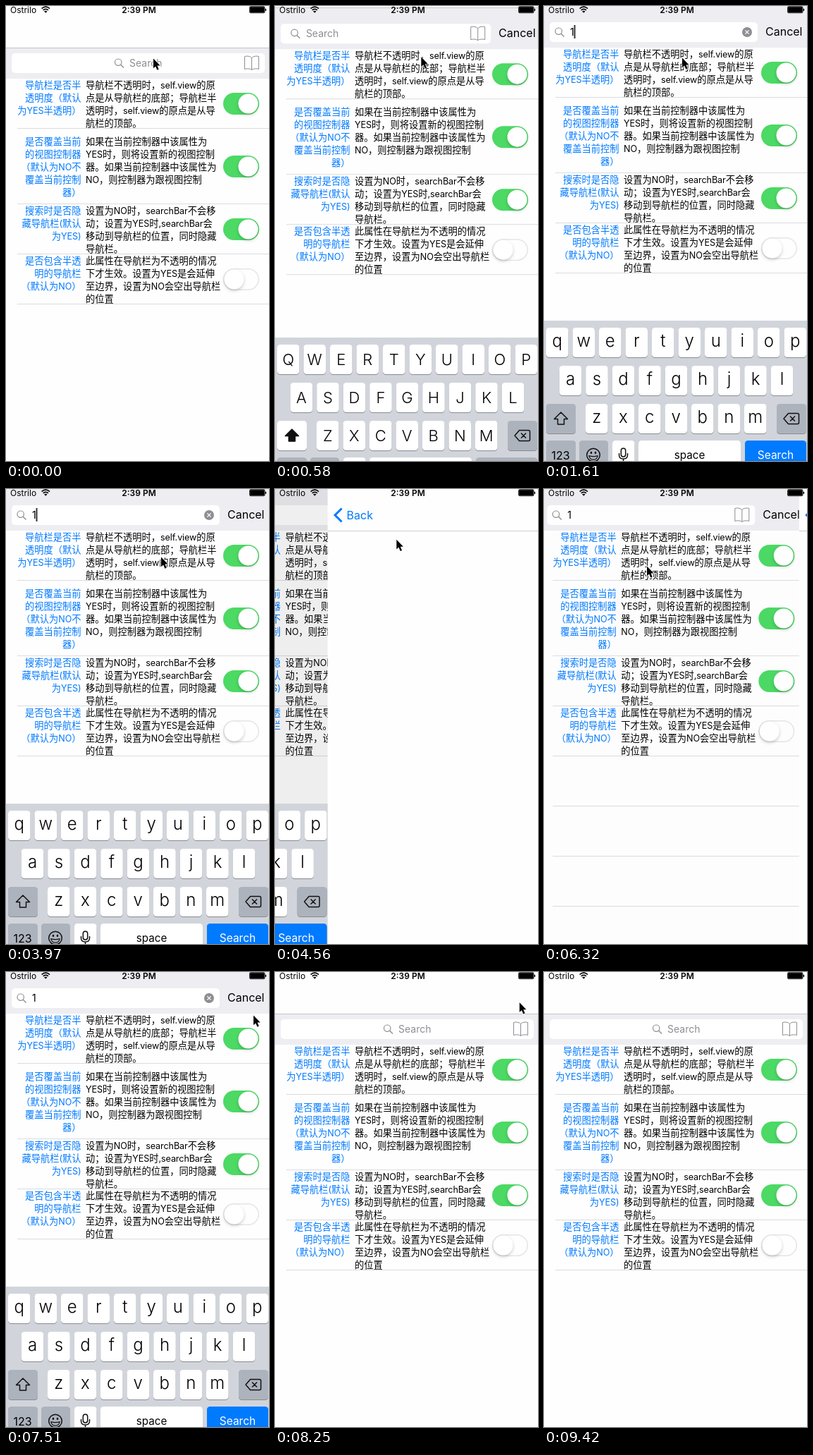
An HTML page that plays this animation: 373x645 px, repeating every 9760 ms.

```html
<!DOCTYPE html>
<html lang="zh-CN">
<head>
<meta charset="utf-8">
<style>
html, body { margin: 0; width: 373px; height: 645px; overflow: hidden; background: #fefefe; }
svg { display: block; }
text { font-family: Inter, Roboto, sans-serif; }
.cjk { font: 13.25px "Noto Sans CJK SC", "Noto Sans CJK", sans-serif; }
.cjk tspan { font: 12.6px Inter, Roboto, sans-serif; letter-spacing: -.1px; }
.end { text-anchor: end; fill: #007aff; }
.mid { text-anchor: middle; }
.letter { font-weight: 300; }
.knob { fill: #fff; filter: drop-shadow(0 2px 2px #0003); }
.line { fill: none; stroke: #8e8e93; }
.ink { fill: none; stroke: #111; stroke-width: 1.5; stroke-linejoin: round; }
</style>
</head>
<body>
<svg id="stage" width="373" height="645" viewBox="0 0 373 645"></svg>
<script>
const W = 373, STEP = 147.2, LOOP = 9760, BLUE = '#007aff';
const stage = document.getElementById('stage');

// Each track lists [step, ...values]; values are interpolated linearly.
const cursorTrack = [[0, 209, 74.5], [2, 209, 74.5], [8, 204, 68], [11, 196, 73.5], [13, 196, 73.5],
  [17, 207, 132], [20, 180, 100], [22, 10, 45], [25, 356, 45], [27, 220, 96.5], [29, 217, 95],
  [32, 150, 60], [35, 86, 38.5], [39, 84, 38], [43, 146, 109.5], [46, 160, 45], [48, 200, 48],
  [51, 351, 61.5], [53, 346, 38], [57, 347, 45], [60, 320, 200], [63, 348, 602]];
const searchTrack = [[2, 0], [3, .5], [4, .95], [5, 1], [53, 1], [54, .6], [55, .12], [56, 0]];
const pushTrack = [[29, 0], [30, .45], [31, .8], [32, .95], [33, 1], [39, 1], [40, .6],
  [41, .28], [42, .1], [43, .03], [44, 0]];
const keyboardTrack = [[2, 0], [3, .45], [4, .88], [5, 1], [33, 1], [34, 0], [45, 0],
  [46, .5], [47, 1], [53, 1], [54, .6], [55, .15], [56, 0]];

function at(track, k) {
  const i = track.findIndex(p => p[0] > k);
  if (i < 0) return track.at(-1).slice(1);
  if (!i) return track[0].slice(1);
  const a = track[i - 1], b = track[i], f = (k - a[0]) / (b[0] - a[0]);
  return a.slice(1).map((v, j) => v + (b[j + 1] - v) * f);
}

const rect = (x, y, w, h, fill, r = 0) => `<rect x="${x}" y="${y}" width="${w}" height="${h}" fill="${fill}" rx="${r}"/>`;
const text = (x, y, s, size, attrs = '') => `<text x="${x}" y="${y}" font-size="${size}" ${attrs}>${s}</text>`;
const group = (x, y, s) => `<g transform="translate(${x} ${y})">${s}</g>`;
const path = (d, attrs) => `<path d="${d}" ${attrs}/>`;
const divider = y => rect(16, y, W - 16, 1, '#dcdce0');
const lines = (x, y, s, cls) => s.split('/').map((t, i) =>
  text(x, y + 5 + i * 18, t.replace(/[!-~]+/g, '<tspan>$&</tspan>'), 13.25, `class="cjk ${cls}"`)).join('');

// top line centre, switch centre, divider, switch state, title, description
const rows = [
  [112, 138.5, 173, 1, '导航栏是否半/透明度（默认/为YES半透明）',
    '导航栏不透明时，self.view的原/点是从导航栏的底部；导航栏半/透明时，self.view的原点是从导/航栏的顶部。'],
  [192, 227.5, 280, 1, '是否覆盖当前/的视图控制器/（默认为NO不/覆盖当前控制/器）',
    '如果在当前控制器中该属性为/YES时，则将设置新的视图控制/器。如果当前控制器中该属性为/NO，则控制器为跟视图控制'],
  [290, 316.5, 351, 1, '搜索时是否隐/藏导航栏(默认/为YES)',
    '设置为NO时，searchBar不会移/动；设置为YES时,searchBar会/移动到导航栏的位置，同时隐藏/导航栏。'],
  [361, 387.5, 422, 0, '是否包含半透/明的导航栏/（默认为NO）',
    '此属性在导航栏为不透明的情况/下才生效。设置为YES是会延伸/至边界，设置为NO会空出导航栏/的位置']
];

function toggle(y, on) {
  const x = on ? 343.5 : 323.5;
  const track = on ? rect(308, y - 15.5, 51, 31, '#4cd964', 15.5)
    : `<rect x="308.75" y="${y - 14.75}" width="49.5" height="29.5" rx="14.75" fill="#fefefe" stroke="#e5e5e5" stroke-width="1.5"/>`;
  return track + `<circle cx="${x}" cy="${y}" r="14" class="knob"/>`;
}

const list = rows.map(([y, sw, end, on, title, info]) =>
  lines(106.5, y, title, 'end') + lines(113, y, info, '') + toggle(sw, on) + divider(end)).join('');
const emptyRows = [493, 564, 635].map(divider).join('');

const magnifier = '<circle cx="-1.3" cy="-1.3" r="4.7" class="line" stroke-width="1.2"/>' +
  path('M2.2 2.2L6.5 6.5', 'class="line" stroke-width="1.4"');
const bookmark = path('M0-7.5C-2-10-7-10.5-10-9.5V8.5C-7 7.5-2 7.5 0 9.5C2 7.5 7 7.5 10 8.5V-9.5C7-10.5 2-10 0-7.5V9.5', 'class="line"');
const clearIcon = '<circle r="7" fill="#8e8e93"/>' + path('M-2.6-2.6L2.6 2.6M2.6-2.6L-2.6 2.6', 'stroke="#fff" stroke-width="1.3"');

function searchPage(p, typed, focused, caret, showEmpty) {
  const right = 367 - 64 * p, textX = 175 - 138 * p;
  const field = rect(8, 67, right - 8, 28, '#fff', 5) + group(160.5 - 138.5 * p, 81, magnifier) +
    (typed ? text(37, 86, '1', 14) : text(textX, 86, 'Search', 14, 'fill="#8e8e93"')) +
    (typed && focused ? group(288, 81, clearIcon) : group(right - 18.5, 81, bookmark)) +
    (caret ? rect(typed ? 42.5 : 37, 71, 2, 19, '#333') : '') +
    text(314 + 62 * (1 - p), 86, 'Cancel', 16);
  return rect(0, 0, W, 645, '#fefefe') + group(0, -44 * p, list + (showEmpty ? emptyRows : '')) +
    rect(0, 0, W, 60 * (1 - p), '#fefefe') +
    rect(0, 60 * (1 - p), W, 43 + 16 * p, '#ededf2') +
    rect(0, 59 - 60 * p, W, 1, '#c4c4c8') + group(0, -44 * p, field);
}

const backPage = rect(0, 0, W, 645, '#fefefe') + rect(0, 59, W, 1, '#cfcfd2') +
  path('M20 27.5L10.5 37L20 46.5', `fill="none" stroke="${BLUE}" stroke-width="3"`) +
  text(27, 43, 'Back', 16, `fill="${BLUE}"`);

const key = (x, y, w, fill) => rect(x, y + 1, w, 42, '#888b90', 4.5) + rect(x, y, w, 42, fill, 4.5);

function keyboard(caps, ready) {
  const grey = '#adb3bd';
  const letters = (s, x, y) => [...s].map((c, i) => key(x + i * 37.5, y, 31.5, '#fff') +
    text(x + 15.75 + i * 37.5, y + (caps ? 29 : 27), caps ? c.toUpperCase() : c, caps ? 22 : 24, 'class="mid letter"')).join('');
  return rect(0, 446, W, 200, '#d1d5db') +
    letters('qwertyuiop', 3, 456) + letters('asdfghjkl', 21.75, 510) + letters('zxcvbnm', 59, 564) +
    key(3, 564, 42, caps ? '#fff' : grey) + path('M24 576l-9.5 9.5h5v7.5h9v-7.5h5z', `class="ink" ${caps ? 'style="fill:#111"' : ''}`) +
    key(330, 564, 42, grey) + path('M340 585l6.5-7.5h13q2 0 2 2v11q0 2-2 2h-13zM349 581.5l7 7M356 581.5l-7 7', 'class="ink"') +
    key(3, 616, 42, grey) + text(23.5, 642.5, '123', 16, 'class="mid"') +
    key(50, 616, 41, grey) + '<circle cx="70" cy="636.5" r="9.3" class="ink"/><ellipse cx="67" cy="633.3" rx="1.2" ry="1.8"/><ellipse cx="73" cy="633.3" rx="1.2" ry="1.8"/>' +
    path('M63.8 637.5q6.2 2.4 12.4 0q-1 5.6-6.2 5.6t-6.2-5.6z', 'class="ink" style="stroke-width:1.2"') +
    key(97, 616, 31.5, '#fff') + '<rect x="109.3" y="627" width="6.4" height="12" rx="3.2" class="ink"/>' +
    path('M106.5 634v2.5q0 5.5 6 5.5t6-5.5v-2.5M112.5 642v3', 'class="ink"') +
    key(134, 616, 145, '#fff') + text(206.5, 642, 'space', 15.2, 'class="mid"') +
    key(285, 616, 87, ready ? BLUE : grey) + text(328.5, 642, 'Search', 15.5, `class="mid" fill="${ready ? '#fff' : '#7c818a'}"`);
}

const statusBar = text(6, 10, 'Ostrilo', 12) + text(188.5, 10, '2:39 PM', 12, 'class="mid" font-weight="600"') +
  path('M50.6 3.6Q56.3-1.4 62 3.6M52.7 5.9Q56.3 2.8 59.9 5.9', 'fill="none" stroke="#000" stroke-width="1.7"') +
  path('M56.3 9.8L54 7.6Q56.3 5.9 58.6 7.6z', '') +
  '<rect x="345.5" y=".8" width="21.5" height="9" rx="1.5" fill="#777" stroke="#000" stroke-width=".8"/>' +
  rect(346.3, 1.6, 19.9, 7.4, '#000', .6) + rect(367.6, 3.7, 1.5, 3.4, '#000', .7);

const cursor = path('M0 0V13.8L3.1 10.9L5.4 16.3L7.7 15.3L5.5 10H9.6z', 'stroke="#fff" stroke-width="1.4" paint-order="stroke"');

function draw(k) {
  const [p] = at(searchTrack, k), [push] = at(pushTrack, k), [rise] = at(keyboardTrack, k);
  const typed = k >= 9 && k < 53;
  const focused = k >= 3 && k < 29 || k >= 46 && k < 53;
  const blink = Math.floor((k < 40 ? k : k + 4) / 3.4) % 2 === 1;
  const showEmpty = k >= 29 && k < 53;
  const [cx, cy] = at(cursorTrack, k);
  stage.innerHTML =
    group(-W * .33 * push, 0, searchPage(p, typed, focused, focused && k > 4 && blink, showEmpty)) +
    (push ? rect(0, 0, W, 645, `rgba(0,0,0,${.08 * push})`) + group(W * (1 - push), 0, backPage) : '') +
    (rise ? group(-W * push, 200 * (1 - rise), keyboard(k < 9, typed)) : '') +
    statusBar + (k < 64 ? group(cx, cy, cursor) : '');
}

let shown = -1;
const start = performance.now();
function tick() {
  const k = Math.floor(((performance.now() - start) % LOOP + 15) / STEP);
  if (k !== shown) draw(shown = k);
  requestAnimationFrame(tick);
}
tick();
</script>
</body>
</html>
```
